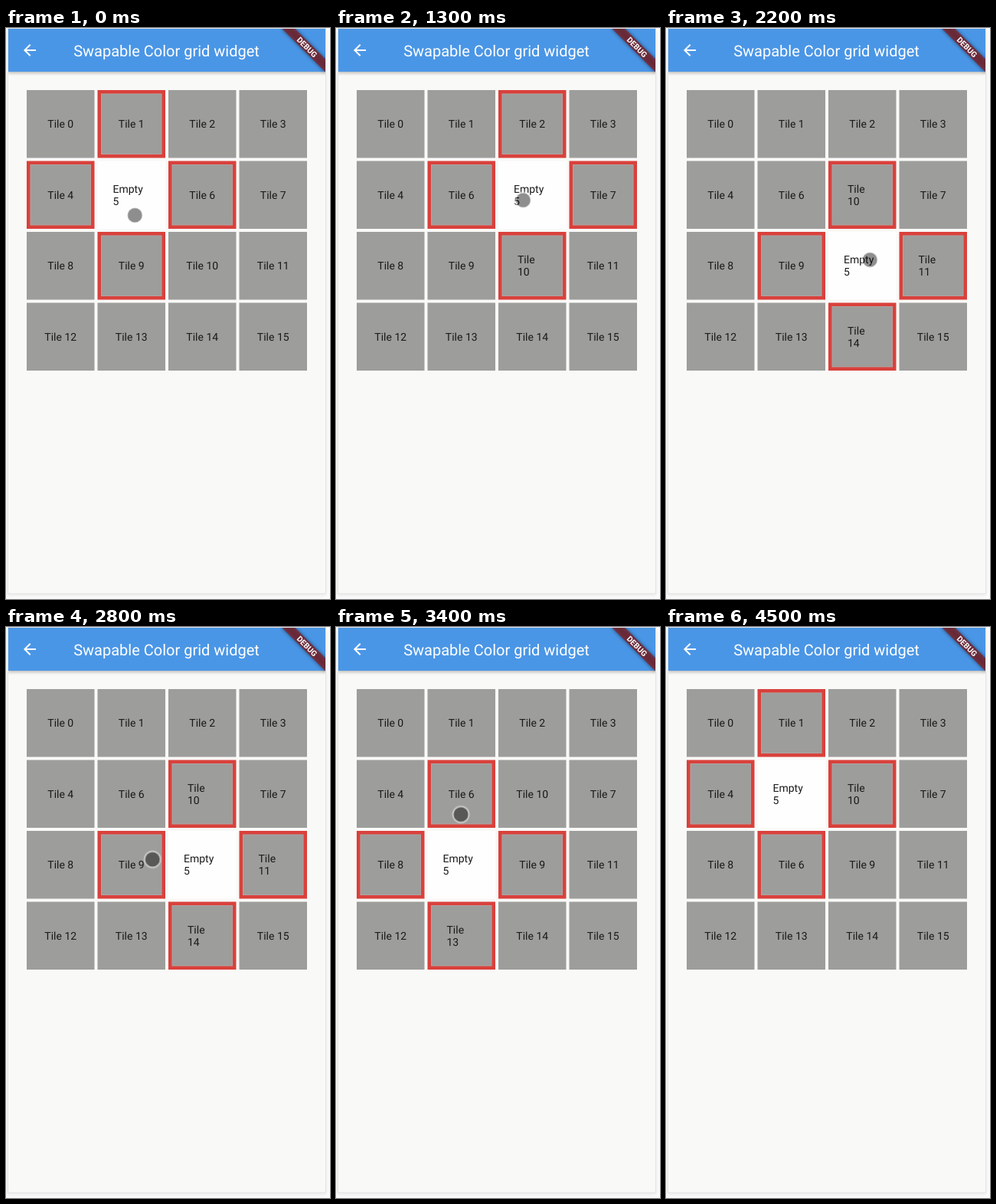
These frames come from a looping animation (423x745 px, 4.9 s). An HTML page:

```html
<!DOCTYPE html>
<html lang="en">
<head>
<meta charset="utf-8">
<title>Tile grid</title>
<style>
html, body { margin: 0; width: 100%; height: 100%; overflow: hidden; background: #fbfbfb; }
svg { display: block; width: 100%; height: 100%; font-family: Roboto, "Noto Sans", sans-serif; }
text { text-rendering: geometricPrecision; }
#board { font-size: 14px; fill: #1a1a1a; }
#pointer { animation: leave 4900ms step-end infinite; }
@keyframes leave { 91.83% { opacity: 0; } }
</style>
</head>
<body>
<svg viewBox="0 0 423 745">
  <defs>
    <clipPath id="screen"><rect x="3" y="1" width="414" height="737"/></clipPath>
    <filter id="soft" x="-20%" y="-100%" width="140%" height="300%"><feGaussianBlur stdDeviation="2.5"/></filter>
  </defs>
  <rect x="2" y="4" width="416" height="736" fill="#000" opacity=".08" filter="url(#soft)"/>
  <rect x="2.5" y=".5" width="415" height="737.5" fill="#f9f9f7" stroke="#e4e4e4"/>
  <g clip-path="url(#screen)">
    <rect x="2" y="3" width="416" height="55" fill="#000" opacity=".35" filter="url(#soft)"/>
    <rect x="2" y="1" width="416" height="56" fill="#4a96e6"/>
    <path transform="translate(19 17)" fill="#fff" d="M20 11H7.83l5.59-5.59L12 4l-8 8 8 8 1.41-1.41L7.83 13H20v-2z"/>
    <text x="88.2" y="37" font-size="20" fill="#fff">Swapable Color grid widget</text>
    <g transform="translate(417 1) rotate(45)">
      <rect x="-40" y="28" width="80" height="12" fill="#000" opacity=".5" filter="url(#soft)"/>
      <rect x="-40" y="28" width="80" height="12" fill="#000" opacity=".3"/>
      <rect x="-40" y="28" width="80" height="12" fill="#b71c1c" opacity=".5"/>
      <text y="37.6" font-size="10.2" font-weight="700" fill="#fff" text-anchor="middle">DEBUG</text>
    </g>
    <g id="board"></g>
    <g id="pointer">
      <circle r="9.6" fill="#000" fill-opacity=".44"/>
      <circle r="10.5" fill="none" stroke="#fff" stroke-opacity=".45" stroke-width="2"/>
    </g>
  </g>
</svg>
<script>
const LOOP = 4900, STEP = 100, EMPTY = 5;
const SIZE = 88.5, PITCH = 92.5, LEFT = 27, TOP = 81, BORDER = 5;
const GREY = '#9d9d9b', RED = '#d9413c';

const start = { x: 168.3, y: 244.3 };
const strokes = [
  { from: 700, to: 900, x: 244.4, y: 224.6 },
  { from: 1600, to: 1900, x: 266.3, y: 302.4 },
  { from: 2300, to: 2500, x: 233.7, y: 309.3 },
  { from: 2600, to: 2800, x: 191.3, y: 303.2 },
  { from: 2900, to: 3100, x: 168.4, y: 271.4 },
  { from: 3200, to: 3500, x: 162.4, y: 241.2 },
  { from: 3900, to: 4100, x: 157.5, y: 157 },
  { from: 4200, to: 4400, x: 98.5, y: 40.5 }
];
// At each drop the empty tile swaps with the tile under the pointer.
const drops = [1300, 2200, 2900, 3700];

const board = document.getElementById('board');
const pointer = document.getElementById('pointer');

const easeOut = p => 1 - (1 - p) ** 2;

function pointerAt(t) {
  const now = Math.floor(t / STEP) * STEP;
  let { x, y } = start;
  for (const s of strokes) {
    const p = Math.min(1, Math.max(0, (now - s.from) / (s.to - s.from)));
    x += (s.x - x) * easeOut(p);
    y += (s.y - y) * easeOut(p);
  }
  return { x, y };
}

const cellAt = ({ x, y }) =>
  Math.floor((y - TOP) / PITCH) * 4 + Math.floor((x - LEFT) / PITCH);

function isNeighbour(a, b) {
  const dx = Math.abs(a % 4 - b % 4);
  const dy = Math.abs((a >> 2) - (b >> 2));
  return dx + dy === 1;
}

const square = (x, y, inset, fill) => {
  const side = SIZE - 2 * inset;
  return `<rect x="${x + inset}" y="${y + inset}" width="${side}" height="${side}" fill="${fill}"/>`;
};

const label = (x, y, text, anchor = 'start') =>
  `<text x="${x}" y="${y}" text-anchor="${anchor}">${text}</text>`;

const wrapped = (x, mid, top, bottom) =>
  label(x, mid - 3, top) + label(x, mid + 13, bottom);

function tile(id, cell, hole) {
  const x = LEFT + cell % 4 * PITCH;
  const y = TOP + (cell >> 2) * PITCH;
  const mid = y + SIZE / 2;
  if (cell === hole) {
    return square(x, y, 0, '#fefefe') + wrapped(x + 20, mid, 'Empty', id);
  }
  const framed = isNeighbour(cell, hole);
  const back = framed
    ? square(x, y, 0, RED) + square(x, y, BORDER - .5, '#b3a5a2') + square(x, y, BORDER + .4, GREY)
    : square(x, y, 0, GREY);
  return back + (framed && id > 9
    ? wrapped(x + 20 + BORDER, mid, 'Tile', id)
    : label(x + SIZE / 2, mid + 5, 'Tile ' + id, 'middle'));
}

function drawBoard(count) {
  const ids = [...Array(16).keys()];
  let hole = EMPTY;
  for (const time of drops.slice(0, count)) {
    const to = cellAt(pointerAt(time));
    [ids[hole], ids[to]] = [ids[to], ids[hole]];
    hole = to;
  }
  board.innerHTML = ids.map((id, cell) => tile(id, cell, hole)).join('');
}

const clock = pointer.getAnimations()[0];
let shown = -1;
function frame() {
  const t = performance.now() % LOOP;
  clock.currentTime = t;
  const count = drops.filter(time => time <= t).length;
  if (count !== shown) drawBoard(shown = count);
  const { x, y } = pointerAt(t);
  pointer.setAttribute('transform', `translate(${x} ${y})`);
  requestAnimationFrame(frame);
}
frame();
</script>
</body>
</html>
```
